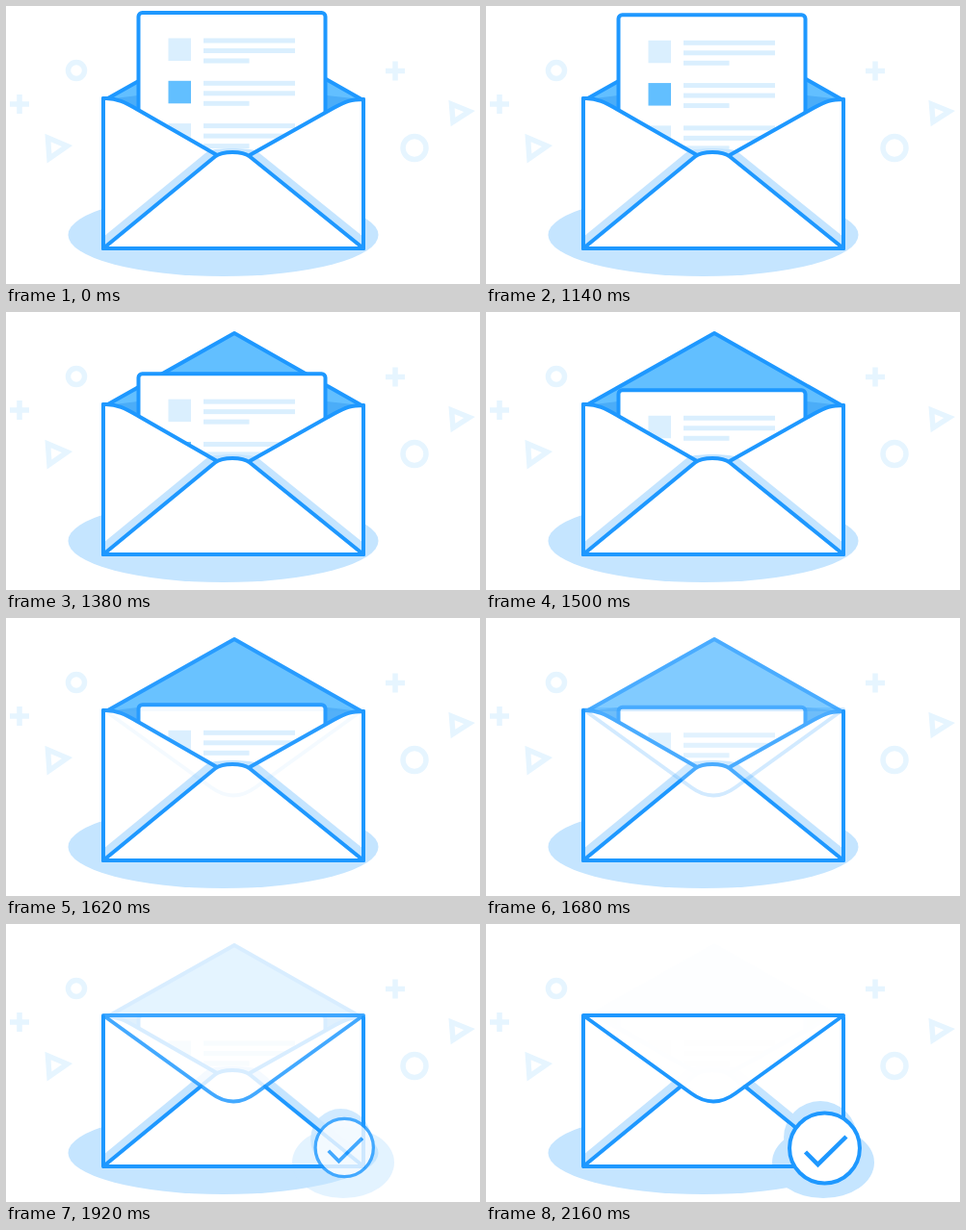
Animation of 492 by 289 pixels, one loop 3060 ms. Source, as an HTML page:

```html
<!DOCTYPE html>
<html lang="en">
<head>
<meta charset="utf-8">
<title>Envelope closing</title>
<style>
  html, body { margin: 0; width: 100%; height: 100%; overflow: hidden; background: #fff; }
  svg { display: block; width: 492px; height: 289px; background: #fff; }
  .line { fill: none; stroke: #1e98ff; stroke-width: 4; stroke-linecap: round; stroke-linejoin: round; }
  .white { fill: #fff; }
  .shade { fill: #c5e5ff; }
  .blend { mix-blend-mode: darken; }
  .decor { fill: none; stroke: #e6f5ff; stroke-width: 5.5; }
</style>
</head>
<body>
<svg viewBox="0 0 492 289">
  <g class="decor">
    <circle cx="73" cy="67" r="8.5"/>
    <circle cx="424" cy="147.5" r="12"/>
    <path d="M4 102H24M14 92V112M394 67.5H414M404 57.5V77.5"/>
    <path d="M43.5 137L63.5 145.5L45 158.5ZM462.5 102L481 109.5L464 120.5Z"/>
  </g>
  <ellipse class="shade" cx="225.5" cy="238" rx="161" ry="43"/>

  <!-- closed body -->
  <path class="white" d="M101 95H371V252H101Z"/>
  <path class="shade" d="M101 252V240L194.500 162.800L202 169ZM371 252V240L276.500 162.800L269 169Z"/>
  <path class="line" d="M101 96V252H371V97M101 252L202 169M371 252L269 169"/>

  <!-- open flap, letter and pocket -->
  <g id="open">
    <path fill="#62bfff" d="M104 97L237 22L369 97L236 165Z"/>
    <path fill="#4badf8" d="M104 97L137 93H333L369 97L236 165Z"/>
    <path class="line" d="M104 97L237 22L369 97"/>
    <g id="letter">
      <rect class="line white" x="137.500" width="194" height="150" rx="4" style="fill:#fff"/>
      <g id="rows"></g>
    </g>
    <path class="white" d="M101 252V96C115 95 125 101 138 108.500L219 155H253L340 106C353 99 358 97 371 97V252Z"/>
    <path class="shade" d="M101 252V240L210 150.600C220 147 250 147 260 150.600L371 240V252Z"/>
    <path class="line" d="M101 252V96C115 95 125 101 138 108.500L219 155M253 155L340 106C353 99 358 97 371 97V252"/>
    <path class="line" style="fill:#fff" d="M101 252L217 156.500C225 150.500 245 150.500 253 156.500L371 252Z"/>
  </g>

  <path id="closed" class="line" d="M101 95L213 176Q236 193 259 176L371 95Z"/>

  <!-- confirmation badge -->
  <ellipse id="pool" class="shade blend" cx="350" cy="248" rx="53" ry="37"/>
  <circle id="halo" class="shade blend" cx="347" cy="222" r="38"/>
  <g id="badge">
    <circle class="line" style="fill:#fff" cx="351.500" cy="233" r="36.500"/>
    <path class="line" style="stroke-linecap:butt;stroke-linejoin:miter;stroke-width:4.500" d="M331.500 237L344.500 250L374 221"/>
  </g>
</svg>
<script>
const LOOP = 3060, STEP = 60, REST = 2160;
const el = id => document.getElementById(id);
const open = el('open'), letter = el('letter'), closed = el('closed');
const pool = el('pool'), halo = el('halo'), badge = el('badge');

const bar = (x, y, w, h, fill) =>
  `<rect x="${x}" y="${y}" width="${w}" height="${h}" fill="${fill}"/>`;
const pale = '#daeffe';
el('rows').innerHTML = [0, 1, 2].map(i => {
  const y = 26.5 + 44.3 * i;
  return bar(168.5, y, 23.5, 23.5, i === 1 ? '#62bfff' : pale) +
    bar(205, y, 95, 5, pale) + bar(205, y + 10.5, 95, 5, pale) + bar(205, y + 21, 47.5, 5, pale);
}).join('');

// cubic-bezier(.25, .1, .25, 1)
function ease(x) {
  if (x <= 0) return 0;
  if (x >= 1) return 1;
  const curve = (a, b, s) => 3 * a * s * (1 - s) ** 2 + 3 * b * s * s * (1 - s) + s ** 3;
  let lo = 0, hi = 1;
  for (let i = 0; i < 24; i++) {
    const mid = (lo + hi) / 2;
    if (curve(.25, .25, mid) < x) lo = mid; else hi = mid;
  }
  return curve(.1, 1, lo);
}

function draw(time) {
  // the motion advances in even steps, then rests
  const t = Math.min(Math.floor(time % LOOP / STEP) * STEP, REST);
  const span = (start, length) => ease((t - start) / length);

  const slide = span(1110, 715), fade = span(1580, 640), pop = span(1670, 520);
  letter.setAttribute('transform', `translate(0 ${7 + 88 * slide})`);
  open.setAttribute('opacity', 1 - fade);
  closed.setAttribute('opacity', fade);

  const scale = .2 + .8 * pop;
  const grow = `translate(350 230) scale(${scale}) translate(-350 -230)`;
  for (const part of [halo, badge]) {
    part.setAttribute('transform', grow);
    part.setAttribute('opacity', pop);
  }
  pool.setAttribute('opacity', pop ** 3);
}

const start = performance.now();
function tick() {
  draw(performance.now() - start);
  requestAnimationFrame(tick);
}
tick();
</script>
</body>
</html>
```
